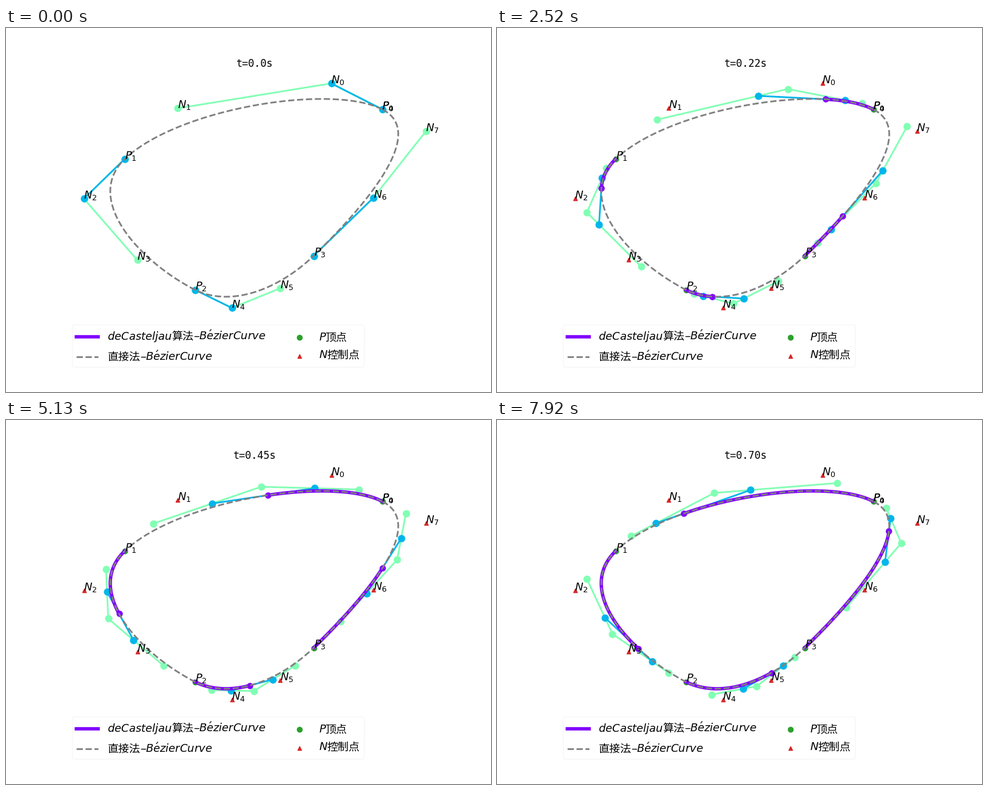
A matplotlib script for the animation above (8000 ms loop, 800 by 600 pixels).

```python
import numpy as np
import matplotlib.pyplot as plt
from matplotlib.animation import FuncAnimation
from matplotlib.patches import FancyBboxPatch

STEP_COUNT, LOOP_MS, DIVISIONS = 89, 8000, 125
PURPLE, BLUE, MINT = plt.cm.rainbow([0.0, 0.25, 0.5])
GRAY = "gray"
CJK = "Noto Sans CJK JP"
SIZE = 13

P = np.array([(620.5, 134), (195.5, 216.2), (311.5, 431.5),
              (507.5, 375.5), (620.5, 134)])
N = np.array([(536.5, 91.3), (283.3, 132.4), (128.5, 281.4), (216.5, 382.4),
              (372.5, 461.4), (451.5, 429.4), (605.5, 280.4), (692.5, 170.4)])
SEGMENTS = [np.array([P[i], N[2 * i], N[2 * i + 1], P[i + 1]])
            for i in range(4)]


def lerp_level(pts, t):
    return pts[:-1] * (1 - t) + pts[1:] * t


def bezier(pts, ts):
    t = np.asarray(ts)[:, None]
    return ((1 - t) ** 3 * pts[0] + 3 * t * (1 - t) ** 2 * pts[1]
            + 3 * t ** 2 * (1 - t) * pts[2] + t ** 3 * pts[3])


fig = plt.figure(figsize=(8, 6), dpi=100, facecolor="white")
ax = fig.add_axes([0, 0, 1, 1])
ax.set_xlim(0, 800)
ax.set_ylim(600, 0)
ax.axis("off")


def label(x, y, text, **kw):
    return ax.text(x, y, text, fontsize=SIZE, zorder=6, **kw)


# Fixed points, labels and the dashed curve
ax.scatter(*P.T, s=36, c="tab:green", zorder=1)
ax.scatter(*N.T, s=20, c="tab:red", marker="^", zorder=1)
for name, pts in (("P", P), ("N", N)):
    for i, (x, y) in enumerate(pts):
        label(x, y, f"${name}_{i}$")

full = np.vstack([bezier(s, np.linspace(0, 1, 100)) for s in SEGMENTS])
ax.plot(*full.T, "--", color=GRAY, lw=2, zorder=5)

# Legend
ax.add_patch(FancyBboxPatch((113, 493), 474.5, 62.5,
                            boxstyle="round,pad=3.6,rounding_size=3.6",
                            fc="white", ec="#f6f6f6", lw=1, zorder=0))
ax.plot([116, 152], [509, 509], color=PURPLE, lw=4)
ax.plot([116, 152], [542, 542], "--", color=GRAY, lw=2)
ax.scatter([483.5], [510.3], s=36, c="tab:green")
ax.scatter([483.5], [540.7], s=20, c="tab:red", marker="^")

label(167, 514, "$deCasteljau$")
label(273, 514, "算法", family=CJK)
label(313.5, 514, "–", family=CJK, ha="center")
label(318.5, 514, r"$B\'ezierCurve$")
label(167.5, 548, "直接法", family=CJK)
label(226, 548, "–", family=CJK, ha="center")
label(230.5, 548, r"$B\'ezierCurve$")
label(515.5, 515, "$P$")
label(526.5, 515, "顶点", family=CJK)
label(515.5, 544.5, "$N$")
label(529, 544.5, "控制点", family=CJK)

title = ax.text(410, 64, "", family="DejaVu Sans Mono", fontsize=12.2,
                ha="center", va="baseline")


def new_line(color, z, **kw):
    return ax.plot([], [], color=color, zorder=z, **kw)[0]


dots = dict(marker="o", ms=8.7, mew=0, lw=2)
mint = [new_line(MINT, 2, **dots) for _ in SEGMENTS]
blue = [new_line(BLUE, 2.5, **dots) for _ in SEGMENTS]
trace = [new_line(PURPLE, 3, lw=4) for _ in SEGMENTS]
tips = [new_line(PURPLE, 3.5, marker="o", ms=7.5, mew=0, ls="")
        for _ in SEGMENTS]


def draw(k):
    t = k / DIVISIONS
    for i, pts in enumerate(SEGMENTS):
        first = lerp_level(pts, t)
        second = lerp_level(first, t)
        path = bezier(pts, np.arange(k + 1) / DIVISIONS)
        mint[i].set_data(*first.T)
        blue[i].set_data(*second.T)
        trace[i].set_data(*path.T)
        tips[i].set_data(*path[-1:].T)
        trace[i].set_visible(k > 0)
        tips[i].set_visible(k > 0)
    title.set_text(f"t={str(t)[:4]}s")
    return mint + blue + trace + tips + [title]


anim = FuncAnimation(fig, draw, frames=STEP_COUNT, init_func=lambda: draw(0),
                     interval=LOOP_MS / STEP_COUNT, repeat=True,
                     repeat_delay=0)
plt.show()
```
